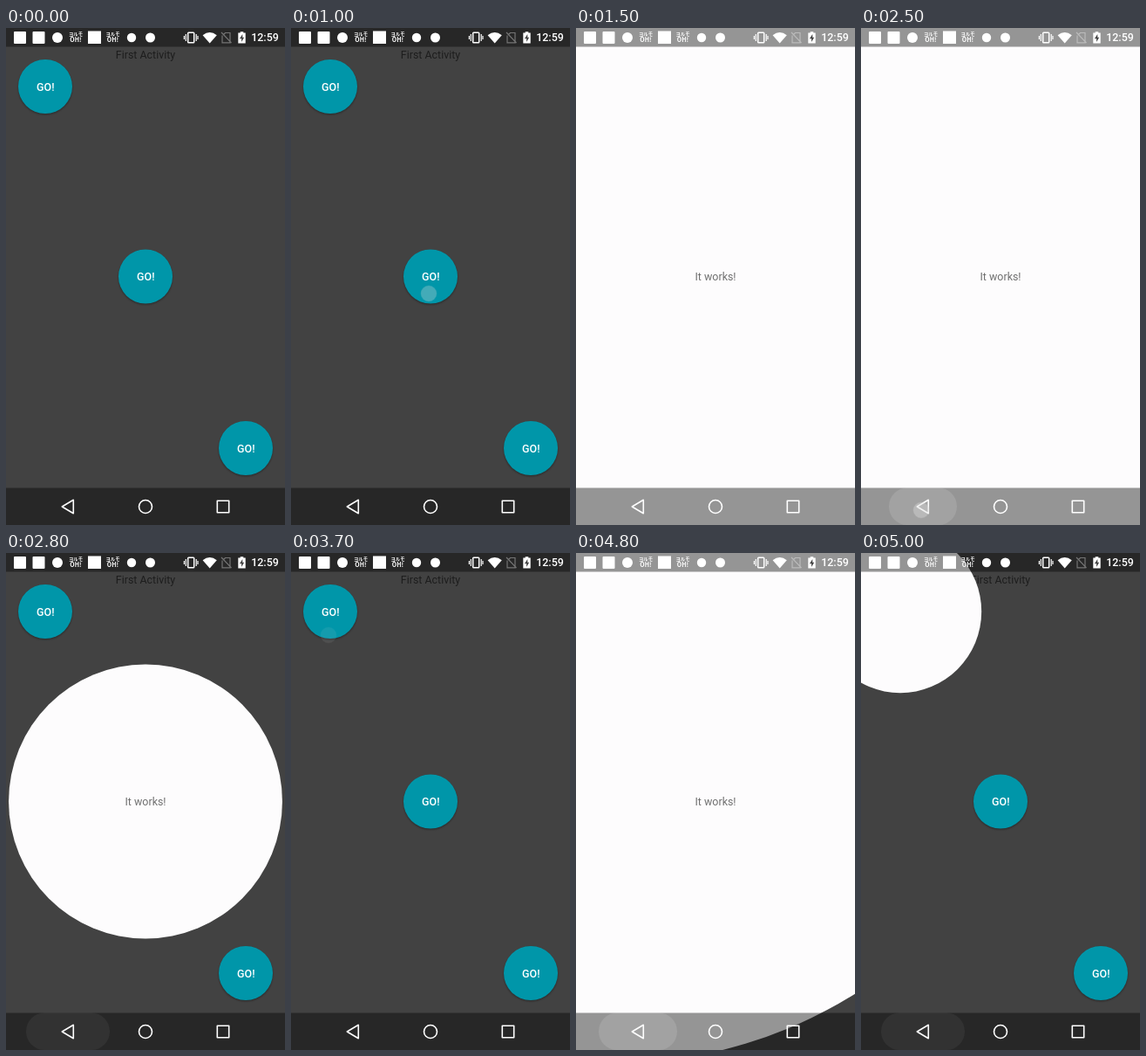
An HTML page that plays this animation: 320x569 px, repeating every 5100 ms.

```html
<!DOCTYPE html>
<html lang="en">
<head>
<meta charset="utf-8">
<title>Circular reveal</title>
<style>
  html, body { margin: 0; width: 100%; height: 100%; overflow: hidden; background: #424242; }
  svg { display: block; width: 100vw; height: 100vh; }
  text { font: 12.44px Roboto, sans-serif; text-anchor: middle; }
  .go, .clock { font-weight: 500; fill: #fff; }
  .tag { font: 700 5.4px "Noto Sans CJK JP", "Noto Sans CJK", sans-serif; fill: #fff; }
  .line { fill: none; stroke: #fff; }
</style>
</head>
<body>
<svg viewBox="0 0 320 569" preserveAspectRatio="none">
  <defs>
    <filter id="blur" x="-20%" y="-20%" width="140%" height="140%"><feGaussianBlur stdDeviation="1.2"/></filter>
    <clipPath id="hole"><circle id="iris"/></clipPath>
    <g id="tag">
      <text class="tag" x="0" y="9">ヨルモ</text>
      <text class="tag" x="0" y="16.4" style="font-size:7px">OH!</text>
    </g>
  </defs>

  <rect width="320" height="569" fill="#424242"/>
  <text x="160" y="35" fill="#000" fill-opacity=".56">First Activity</text>
  <g id="buttons"></g>

  <g id="page" clip-path="url(#hole)">
    <rect width="320" height="569" fill="#fdfcfd"/>
    <circle id="ghost" r="31" fill="#0096a9"/>
    <text x="160" y="289.4" fill="#6f6f6f">It works!</text>
  </g>

  <g fill="#000" fill-opacity=".41">
    <rect width="320" height="21.5"/>
    <rect y="526.5" width="320" height="42.5"/>
  </g>
  <rect id="ripple" y="526.5" height="42.5" rx="21" fill="#fff"/>

  <g id="status" fill="#fff">
    <rect x="9" y="4" width="14" height="14" rx="1"/>
    <rect x="30.5" y="4" width="14" height="14" rx="1"/>
    <circle cx="59" cy="11" r="6"/>
    <use href="#tag" x="80"/>
    <rect x="94" y="3.5" width="15" height="14.5"/>
    <use href="#tag" x="122.5"/>
    <circle cx="144" cy="11" r="5.2"/>
    <circle cx="165.500" cy="11" r="5.5"/>
    <rect class="line" x="208.700" y="5.200" width="7" height="11.600" rx=".8" stroke-width="1.5"/>
    <path class="line" d="M206.300 7v8M218.200 7v8M204.400 9v4M220 9v4" stroke-width="1.2"/>
    <path d="M225.600 8.200Q233.700 1.800 241.800 8.200L233.700 17.500Z"/>
    <path class="line" d="M248 8.500V16.800H257V5.500H251.500L249.500 7.500M247 5L258.500 17" stroke-width="1.2" opacity=".36"/>
    <path d="M266.300 5.500H268.700V4.200H272.300V5.500H274.700V17.500H266.300Z"/>
    <path d="M271.300 7L267.900 12.300H270.100V16L273.200 10.700H271.300Z" fill="#444"/>
  </g>
  <text class="clock" x="297" y="15.400">12:59</text>

  <g class="line" stroke-width="1.6" stroke-linejoin="round">
    <path d="M64.300 548L77.300 540.300V555.700Z"/>
    <circle cx="160" cy="548" r="7.500"/>
    <rect x="242.300" y="541.300" width="13.400" height="13.400"/>
  </g>
  <circle id="touch" r="9" fill="#ddd" stroke="#ccc" stroke-opacity=".4"/>
</svg>

<script>
const LOOP = 5100, STEP = 100, R = 31;
const $ = id => document.getElementById(id);
const set = (el, attrs) => { for (const k in attrs) el.setAttribute(k, attrs[k]); };

const spots = [[45, 67], [160, 284.5], [275, 481]];
$("buttons").innerHTML = spots.map(([x, y]) => `<g>
  <circle cx="${x}" cy="${y + 1.3}" r="${R}" fill="#000" fill-opacity=".35" filter="url(#blur)"/>
  <circle cx="${x}" cy="${y}" r="${R}" fill="#0096a9"/>
  <text class="go" x="${x + .3}" y="${y + 4.5}">GO!</text></g>`).join("");
const buttons = [...$("buttons").children];

// Each visit opens from one button and closes back into it.
const visits = [
  { spot: 1, far: 328, open: [1080, 1380], close: [2608, 2958] },
  { spot: 0, far: 573, open: [3700, 4000], close: [4727, 5077] }
];

// time, x, y, opacity; each row holds for one step
const touches = [
  [900, 158, 304, .3], [1000, 158, 304, .3], [1100, 158, 304, .1],
  [2500, 69, 552, .4], [2600, 69, 552, .15],
  [3500, 43, 94, .3], [3600, 43, 94, .3], [3700, 43, 94, .09],
  [4600, 69, 552, .4], [4700, 69, 552, .3]
];

// width, opacity per step after the back key is pressed
const ripples = [[78, .12], [90, .12], [96, .09], [96, .05], [96, .035], [96, .025], [96, .012]];
const presses = [2500, 4700];

const ease = (t, [a, b]) => {
  const x = Math.min(1, Math.max(0, (t - a) / (b - a)));
  return .5 - .5 * Math.cos(Math.PI * x);
};

function drawPage(t) {
  const v = visits.find(v => t > v.open[0] && t < v.close[1]);
  $("page").style.display = v ? "" : "none";
  buttons.forEach((b, i) => b.style.display = v && v.spot === i ? "none" : "");
  if (!v) return;
  const shown = ease(t, v.open);
  const size = shown - ease(t, v.close);
  const [cx, cy] = spots[v.spot];
  set($("iris"), { cx, cy, r: R + (v.far - R) * size });
  set($("page"), { opacity: shown });
  set($("ghost"), { cx, cy, opacity: 1 - shown });
}

function drawTouch(t) {
  const [, cx, cy, opacity] = touches.find(p => p[0] === t) || [0, 0, 0, 0];
  set($("touch"), { cx, cy, opacity });
  const start = presses.find(p => t >= p && t < p + ripples.length * STEP);
  const [width, opacity2] = start ? ripples[(t - start) / STEP] : [0, 0];
  set($("ripple"), { x: 71 - width / 2, width, opacity: opacity2 });
}

function draw(now) {
  const t = Math.floor((now % LOOP) / STEP) * STEP;
  drawPage(t);
  drawTouch(t);
}

const begin = performance.now();
function tick() {
  draw(performance.now() - begin);
  requestAnimationFrame(tick);
}
tick();
</script>
</body>
</html>
```
